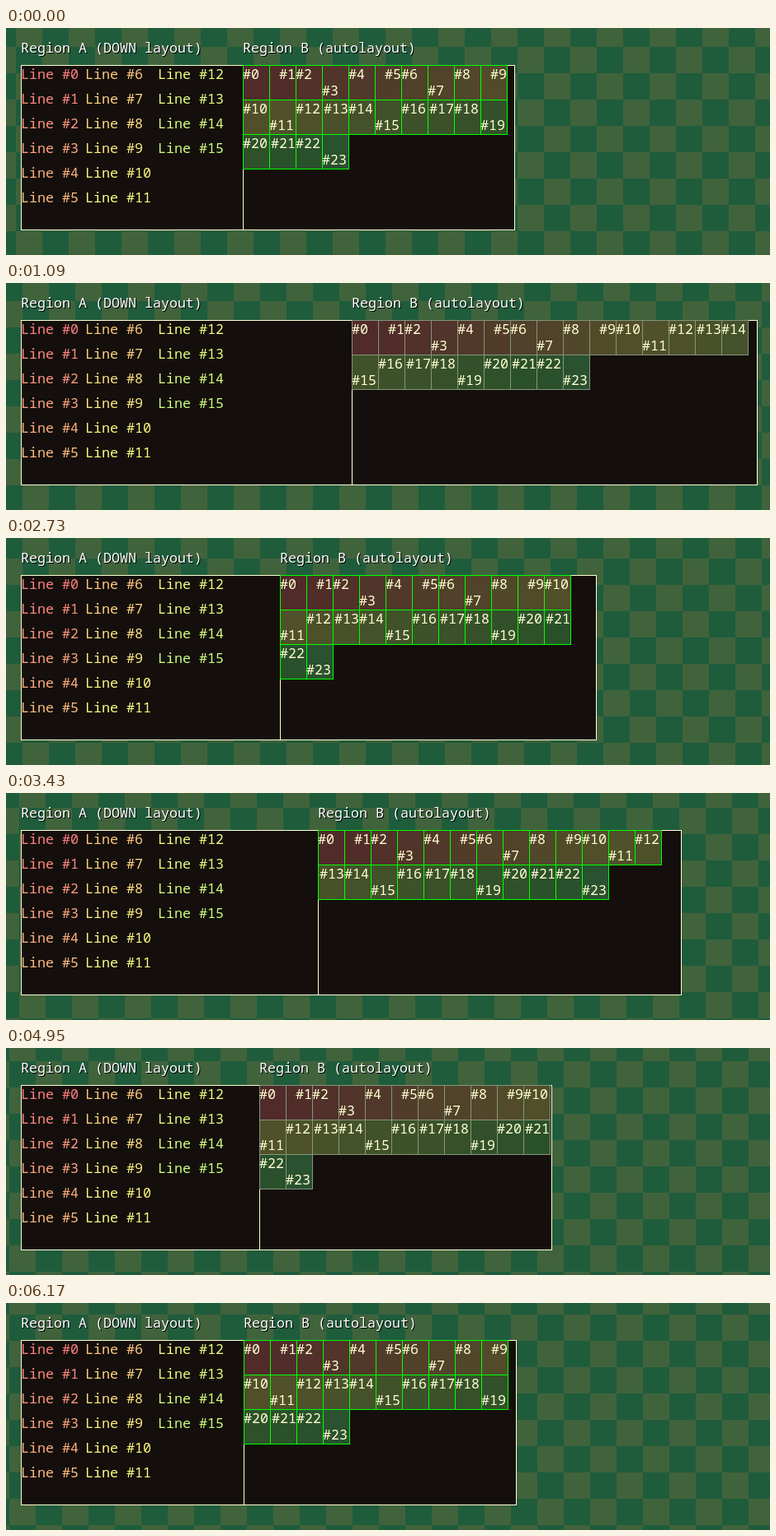
An HTML page with a canvas that plays this animation: 926x276 px, repeating every 6.27 s.

```html
<!DOCTYPE html>
<html lang="en">
<head>
<meta charset="utf-8">
<title>Region layout</title>
<style>
  html, body { margin: 0; width: 926px; height: 276px; overflow: hidden; background: #1f5c3c; }
  canvas { display: block; }
</style>
</head>
<body>
<canvas id="stage" width="926" height="276"></canvas>
<script>
const ctx = document.getElementById('stage').getContext('2d');
const W = 926, H = 276, LOOP = 6270, END = 6170;
const LEFT = 18, TOP = 45, HEIGHT = 200, TILE = 32;
const CELL_W = 32, CELL_H = 42;
const CREAM = '#ffffd2';

// time, total panel width, checker offset x and y
const KEYS = [
  [0, 598, 12, 23],
  [1090, 892, 20, 22],
  [2020, 593, 26, 25],
  [2730, 697, 20, 25],
  [4060, 849.6, 12, 12],
  [4950, 643, 4, 16],
  [6170, 600, 4, 14]
];
// Cell outlines are green except in these spans
const GRAY_SPANS = [[950, 2300], [4200, 5600]];

function slope(i, col) {
  const rate = k => (KEYS[k + 1][col] - KEYS[k][col]) / (KEYS[k + 1][0] - KEYS[k][0]);
  if (i === 0) return rate(0);
  if (i === KEYS.length - 1) return rate(i - 1);
  const a = rate(i - 1), b = rate(i);
  return a * b <= 0 ? 0 : 2 * a * b / (a + b);
}

// Smooth curve through the keys without overshoot
function valueAt(t, col) {
  let i = 0;
  while (i < KEYS.length - 2 && t >= KEYS[i + 1][0]) i++;
  const [p, q] = [KEYS[i], KEYS[i + 1]];
  const d = q[0] - p[0], s = (t - p[0]) / d, s2 = s * s, s3 = s2 * s;
  return (2 * s3 - 3 * s2 + 1) * p[col] + (3 * s2 - 2 * s3) * q[col]
    + d * ((s3 - 2 * s2 + s) * slope(i, col) + (s3 - s2) * slope(i + 1, col));
}

const hue = i => i * 5.625;

function box(x, y, w, h, fill, line) {
  ctx.fillStyle = fill;
  ctx.fillRect(x, y, w + 1, h + 1);
  ctx.strokeStyle = line;
  ctx.strokeRect(x + 0.5, y + 0.5, w, h);
}

function label(text, x, y, color) {
  ctx.fillStyle = color;
  ctx.fillText(text, x, y);
}

function title(text, x) {
  label(text, x + 1, 31, '#000');
  label(text, x, 30, '#fff');
}

function drawChecker(ox, oy) {
  ctx.fillStyle = '#1f5c3c';
  ctx.fillRect(0, 0, W, H);
  ctx.fillStyle = '#40633c';
  for (let r = 0; r * TILE < H + TILE; r++) {
    for (let c = (r + 1) % 2; c * TILE < W + TILE; c += 2) {
      ctx.fillRect(ox + (c - 1) * TILE, oy + (r - 1) * TILE, TILE, TILE);
    }
  }
}

function drawLines() {
  const columns = [LEFT, LEFT + 78, LEFT + 166];
  for (let i = 0; i < 16; i++) {
    label('Line #' + i, columns[Math.floor(i / 6)], 62 + (i % 6) * 30, `hsl(${hue(i)}, 100%, 75%)`);
  }
}

function drawCells(x0, width, line) {
  const perRow = Math.max(1, Math.floor(width / CELL_W));
  const place = i => [x0 + (i % perRow) * CELL_W, TOP + Math.floor(i / perRow) * CELL_H];
  for (let i = 0; i < 24; i++) {
    const [x, y] = place(i);
    box(x, y, CELL_W, CELL_H, `hsl(${hue(i)}, 32%, 24%)`, line);
  }
  for (let i = 0; i < 24; i++) {
    const text = '#' + i;
    const [x, y] = place(i);
    const dx = i % 4 === 1 ? CELL_W - text.length * 10 : 0;
    const dy = i % 4 === 3 ? 20 : 0;
    label(text, x + dx, y + 17 + dy, CREAM);
  }
}

function draw(time) {
  const t = Math.min(time % LOOP, END);
  const total = valueAt(t, 1);
  const split = Math.round(LEFT + total * 0.45);
  const right = Math.round(LEFT + total);
  const gray = GRAY_SPANS.some(([a, b]) => t >= a && t < b);

  drawChecker(Math.round(valueAt(t, 2)), Math.round(valueAt(t, 3)));
  ctx.font = '16.667px "Noto Sans Mono", monospace';
  ctx.lineWidth = 1;
  box(LEFT, TOP, split - LEFT, HEIGHT, '#140f0c', CREAM);
  box(split, TOP, right - split, HEIGHT, '#140f0c', CREAM);
  drawLines();
  drawCells(split, total * 0.55, gray ? '#84967a' : '#00ff00');
  title('Region A (DOWN layout)', LEFT);
  title('Region B (autolayout)', split);
}

const start = performance.now();
function tick() {
  draw(performance.now() - start);
  requestAnimationFrame(tick);
}
tick();
</script>
</body>
</html>
```
